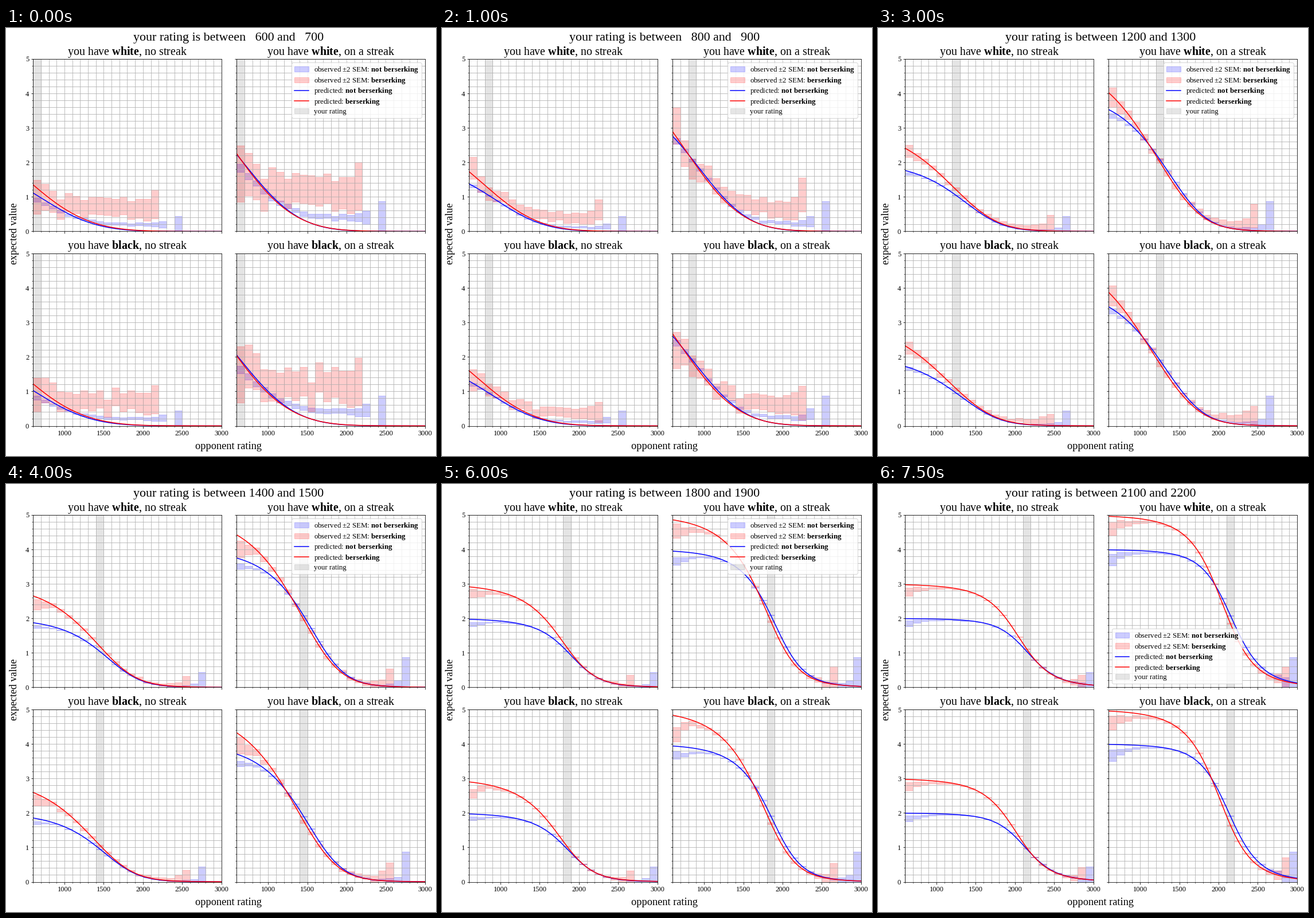
A matplotlib script that plays this animation: 750 px wide and 746 px high, repeating every 8 s.

```python
import numpy as np
import matplotlib.pyplot as plt
from matplotlib.animation import FuncAnimation
from matplotlib.lines import Line2D
from matplotlib.patches import Patch
from matplotlib.ticker import MultipleLocator

plt.rcParams.update({
    "font.family": "Liberation Serif",
    "mathtext.fontset": "custom",
    "mathtext.rm": "Liberation Serif",
    "mathtext.bf": "Liberation Serif:bold",
})

W, H, DPI = 750, 746, 72
FRAMES, STEP = 16, 500
LEGEND_MOVES_AT = 13
OPP = np.linspace(600, 3000, 241)


def strength(rating):
    """Playing strength in logits; the slope peaks near 2100."""
    x = (rating - 600) / 1000
    return 2.7 * x + 1.5 * (np.tanh((x - 1.5) / .65) + .98)


def score(you, opp, black, berserk):
    """Predicted share of the points for a win."""
    mine, theirs = strength(you), strength(opp)
    edge = -.09 if black else .09
    if not berserk:
        return 1 / (1 + np.exp(theirs - mine - edge))
    e = 1 / (1 + np.exp(.935 * theirs - .9 * mine + .38 - edge))
    return e - .035 * e * (1 - e)


def observed(i, black, berserk):
    """Bins with the lower and upper bound of the observed share."""
    last = 100 * round(21 + .44 * i) if berserk else min(2200 + 50 * i, 2800)
    bins = np.arange(600, last + 1, 100)
    weak, near_end = bins - 600, np.exp((bins - last) / 110)

    # Upsets keep the share above a floor that fades as your rating grows.
    shrink, floor = (.5, .23) if berserk else (.15, .11)
    p = score(650 + 100 * i, bins + 50, black, berserk)
    p *= 1 - shrink * np.exp(-1.1 * i)
    p *= 1 - .08 * np.clip((i - 4) / 5, 0, 1) * np.exp(-weak / 230)
    mid = np.hypot(p, floor * np.exp(-.28 * i))

    # Few games at either end of the range widen the error bars.
    if berserk:
        half = (.08 * np.exp(-.35 * i) + .003 + .055 * near_end
                + (.035 + .045 * np.exp(-.25 * i)) * np.exp(-weak / 150))
        mid = np.maximum(mid, half)
    else:
        half = (.014 * np.exp(-.4 * i) + .002 + .03 * near_end
                + (.012 + .026 * (i / 15) ** 3) * np.exp(-weak / 130))
    rng = np.random.default_rng(100 * i + 10 * black + berserk)
    mid += .4 * half * rng.standard_normal(len(bins))
    low, high = np.maximum(mid - half, 0), np.minimum(mid + half, 1)

    # A handful of games against the strongest opponents.
    if not berserk:
        far = min(100 * round(24 + .4 * i), 2900)
        keep = bins < far
        bins = np.append(bins[keep], far)
        low, high = np.append(low[keep], 0), np.append(high[keep], .22)
    return bins, low, high


fig = plt.figure(figsize=(W / DPI, H / DPI), dpi=DPI, facecolor="white")


def label(x, y, s, size, **kw):
    return fig.text(x / W, 1 - y / H, s, fontsize=size, ha="center", **kw)


def spaced(n):
    # A digit is as wide as two spaces.
    return "  " * (4 - len(str(n))) + str(n)


def make_panel(black, streak):
    left, bottom = (402.4 if streak else 47.2), (693.5 if black else 354.5)
    ax = fig.add_axes([left / W, 1 - bottom / H, 328.5 / W, 300.5 / H])
    ax.set(xlim=(600, 3000), ylim=(0, 5))
    ax.xaxis.set_major_locator(MultipleLocator(500))
    ax.xaxis.set_minor_locator(MultipleLocator(100))
    ax.yaxis.set_major_locator(MultipleLocator(1))
    ax.yaxis.set_minor_locator(MultipleLocator(.2))
    ax.grid(True, which="both")
    ax.tick_params(labelsize=12.4, labelbottom=bool(black), labelleft=not streak)
    side = "black" if black else "white"
    run = "on a streak" if streak else "no streak"
    ax.set_title(rf"you have $\mathbf{{{side}}}$, {run}", fontsize=20, pad=7.5)
    lines = [ax.plot(OPP, 0 * OPP, color=c, lw=1.5)[0] for c in ("blue", "red")]
    return ax, black, streak, lines


panels = [make_panel(b, s) for b in (0, 1) for s in (0, 1)]
heading = label(388, 22, "", 22, va="baseline")
label(388, 734.5, "opponent rating", 18.4, va="baseline")
label(15, 358, "expected value", 17.9, va="center", rotation=90)


def swatch(color):
    return Patch(facecolor=color, edgecolor=color, alpha=.2)


PLAIN, BERSERK = r"$\mathbf{not\ berserking}$", r"$\mathbf{berserking}$"
legend_args = dict(
    handles=[swatch("blue"), swatch("red"), Line2D([], [], color="blue"),
             Line2D([], [], color="red"), swatch("gray")],
    labels=["observed ±2 SEM: " + PLAIN, "observed ±2 SEM: " + BERSERK,
            "predicted: " + PLAIN, "predicted: " + BERSERK, "your rating"],
    fontsize=12.9, handlelength=1.9, handletextpad=.7,
    labelspacing=.2, borderaxespad=.47)
live = []


def draw(i):
    while live:
        live.pop().remove()
    you = 600 + 100 * i
    heading.set_text(f"your rating is between {spaced(you)} and {spaced(you + 100)}")
    for ax, black, streak, lines in panels:
        live.append(ax.axvspan(you, you + 100, color="gray", alpha=.2))
        for berserk, color in enumerate(("blue", "red")):
            win = 2 + 2 * streak + berserk
            lines[berserk].set_ydata(win * score(you + 50, OPP, black, berserk))
            bins, low, high = observed(i, black, berserk)
            live.append(ax.bar(bins, win * (high - low), 100, win * low,
                               align="edge", facecolor=color, edgecolor=color,
                               linewidth=1, alpha=.2))
    loc = "upper right" if i < LEGEND_MOVES_AT else "lower left"
    live.append(panels[1][0].legend(loc=loc, **legend_args))
    return []


anim = FuncAnimation(fig, draw, frames=FRAMES, interval=STEP,
                     init_func=lambda: [], repeat=True, repeat_delay=0)
plt.show()
```
